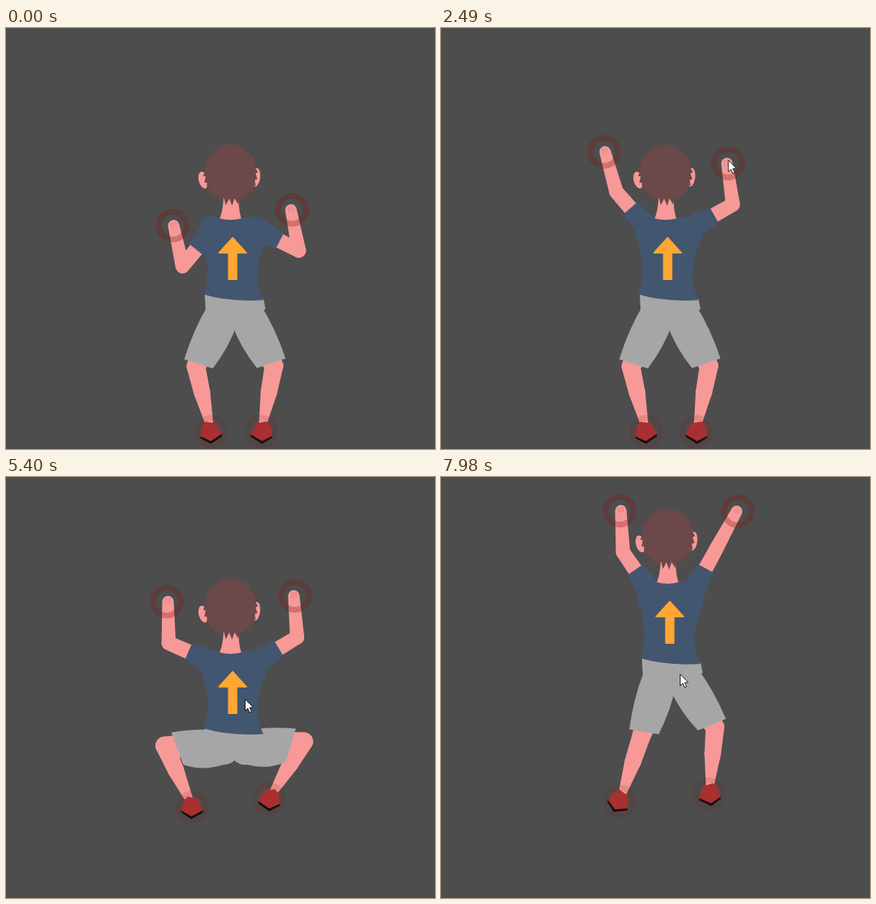
An HTML page with a canvas that plays this animation: 600 by 588 pixels, repeating every 8000 ms.

```html
<!DOCTYPE html>
<html lang="en">
<head>
<meta charset="utf-8">
<title>Climber puppet</title>
<style>
html, body { margin: 0; width: 100%; height: 100%; overflow: hidden; background: #4d4d4d; }
canvas { display: block; }
</style>
</head>
<body>
<canvas id="stage" width="600" height="588"></canvas>
<script>
const ctx = document.getElementById('stage').getContext('2d');
const LOOP = 8000, THIGH = 82, SHIN = 94, UPPER_ARM = 68, FOREARM = 58;
const SKIN = '#f69997', SHIRT = '#43566f', SHORTS = '#a7a6a6', HAIR = '#6b4849';
const SHOE = '#a92f30', ARROW = '#ffa633', BACK = '#4d4d4d';

const point = (x, y) => ({ x, y });
const along = (p, q, u) => point(p.x + (q.x - p.x) * u, p.y + (q.y - p.y) * u);
const angle = (p, q) => Math.atan2(q.y - p.y, q.x - p.x);
const ease = u => u * u * (3 - 2 * u);

// Where the cursor holds a part, relative to that part.
const grips = {
  body: point(334, 331), handL: point(0, -5), handR: point(0, -5),
  footL: point(-10, -3), footR: point(14, -11)
};
const tracks = {};
const place = (part, x, y) => { tracks[part] = [{ t: 0, x, y }]; };

function move(part, start, end, x, y) {
  const track = tracks[part];
  track.push({ ...track[track.length - 1], t: start }, { t: end, x, y });
}

function drag(part, start, end, x, y) {
  const track = tracks[part], from = track[track.length - 1], grip = grips[part];
  tracks.cursor.push({ t: start, x: from.x + grip.x, y: from.y + grip.y });
  move(part, start, end, x, y);
  tracks.cursor.push({ t: end, x: x + grip.x, y: y + grip.y });
}

function sample(track, t) {
  const next = track.findIndex(key => key.t > t);
  if (next < 0) return track[track.length - 1];
  const a = track[next - 1], b = track[next];
  return along(a, b, ease((t - a.t) / (b.t - a.t)));
}

place('cursor', 594, 60);
place('body', 0, 0);
place('handL', 233, 276);
place('handR', 400, 254);
place('footL', 287, 564);
place('footR', 357, 564);

move('cursor', 30, 450, 85, 290);
move('cursor', 450, 780, 233, 271);
drag('handL', 1050, 1530, 214, 185);
drag('handL', 1530, 1650, 228, 173);
drag('handR', 2100, 2700, 402, 164);
drag('footL', 3390, 3540, 289, 546);
drag('footL', 3540, 4050, 249, 456);
drag('footR', 4350, 4620, 367, 501);
drag('footR', 4620, 4740, 368, 450);
move('cursor', 4740, 4890, 334, 331);
drag('body', 5040, 5400, 0, -21);
drag('body', 5400, 5670, 3, -119);
// The planted limbs give a little while the body is pulled up.
move('footL', 5040, 5400, 261, 461);
move('footL', 5400, 5670, 250, 453);
move('footR', 5400, 5670, 375, 443);
move('handL', 5040, 5400, 225, 174);
move('handL', 5400, 5670, 228, 177);
move('handR', 5040, 5400, 404, 166);
move('handR', 5400, 5670, 400, 169);
move('cursor', 5880, 6270, 227, 174);
drag('handL', 6300, 6780, 250, 47);
drag('handR', 7110, 7620, 415, 48);
move('cursor', 7620, 7950, 334, 275);

// Two-bone chain; stretches slightly when the goal is out of reach.
function bend(root, goal, upper, lower, side) {
  const d = Math.hypot(goal.x - root.x, goal.y - root.y), a = angle(root, goal);
  const c = Math.cos(a), s = Math.sin(a);
  const run = (upper * upper - lower * lower + d * d) / (2 * d);
  const rise = side * Math.sqrt(Math.max(0, upper * upper - run * run));
  return { mid: point(root.x + c * run - s * rise, root.y + s * run + c * rise), end: goal };
}

function capsule(p, q, r1, r2, color) {
  const a = angle(p, q), h = Math.PI / 2;
  ctx.fillStyle = color;
  ctx.beginPath();
  ctx.arc(p.x, p.y, r1, a + h, a + 3 * h);
  ctx.arc(q.x, q.y, r2, a - h, a + h);
  ctx.fill();
}

function polygon(points, color) {
  ctx.fillStyle = color;
  ctx.beginPath();
  points.forEach(([x, y]) => ctx.lineTo(x, y));
  ctx.closePath();
  ctx.fill();
}

function ellipse(x, y, rx, ry, turn, color) {
  ctx.fillStyle = color;
  ctx.beginPath();
  ctx.ellipse(x, y, rx, ry, turn, 0, 7);
  ctx.fill();
}

function placed(p, turn, scaleX, scaleY, draw) {
  ctx.save();
  ctx.translate(p.x, p.y);
  ctx.rotate(turn);
  ctx.scale(scaleX, scaleY);
  draw();
  ctx.restore();
}

function ring(p, alpha) {
  ctx.strokeStyle = `rgba(130,20,20,${alpha})`;
  ctx.lineWidth = 8;
  ctx.beginPath();
  ctx.arc(p.x, p.y, 19.5, 0, 7);
  ctx.stroke();
}

function drawArm({ shoulder, arm: { mid, end } }) {
  capsule(shoulder, mid, 11, 10, SKIN);
  capsule(mid, end, 10, 8, SKIN);
  placed(end, angle(mid, end), 1, 1, () => {
    ctx.strokeStyle = 'rgba(170,80,85,.4)';
    ctx.lineWidth = 0.8;
    ctx.beginPath();
    for (let y = -3.5; y <= 3.5; y += 3.5) {
      ctx.moveTo(-3, y);
      ctx.lineTo(5, y * 0.8);
    }
    ctx.stroke();
  });
}

function drawSleeve({ shoulder, arm }) {
  placed(shoulder, angle(shoulder, arm.mid), 1, 1, () => {
    ctx.fillStyle = SHIRT;
    ctx.beginPath();
    ctx.arc(0, 0, 17, Math.PI / 2, Math.PI * 1.5);
    ctx.lineTo(38, -12.5);
    ctx.lineTo(38, 12.5);
    ctx.fill();
  });
}

function drawShin({ hip, side, leg: { mid, end } }) {
  const calf = along(mid, end, 0.4);
  capsule(along(hip, mid, 0.75), mid, 16, 13, SKIN);
  capsule(mid, calf, 13, 11.5, SKIN);
  capsule(calf, along(mid, end, 0.88), 11.5, 5.5, SKIN);
  // The foot turns outward as the thigh lifts.
  const lift = Math.acos(Math.sin(angle(hip, mid)));
  const turn = angle(mid, end) - Math.PI / 2 + side * 0.25 * (lift - 0.54);
  placed(end, turn, side, 1, () => {
    polygon([[-16, 2], [-17, 5], [-4.4, 16.4], [13, 9.8], [13.7, 6]], '#151011');
    polygon([[-11, -11], [-4, -15.5], [9, -10.5], [13.7, 6.5], [-3.6, 12.6], [-16, 2.8]], SHOE);
  });
}

// The hem slants more as the thigh lifts.
function drawThigh({ hip, side, leg }) {
  const turn = angle(hip, leg.mid), drop = Math.sin(turn), inner = 56 + 20 * drop;
  placed(hip, turn, 1, side, () => {
    ctx.fillStyle = SHORTS;
    ctx.beginPath();
    ctx.arc(0, 0, 23, Math.PI / 2, Math.PI * 1.5);
    ctx.quadraticCurveTo(inner * 0.5, -33 + 5 * drop, inner, -25 + 3 * drop);
    ctx.lineTo(74 + 8 * drop, 19);
    ctx.quadraticCurveTo(38, 27, 0, 25);
    ctx.fill();
  });
}

function drawHead() {
  ctx.fillStyle = SKIN;
  ctx.beginPath();
  ctx.moveTo(304, 230);
  ctx.quadraticCurveTo(305, 250, 299, 266);
  ctx.quadraticCurveTo(314, 270, 329, 266);
  ctx.quadraticCurveTo(324, 250, 326, 230);
  ctx.fill();
  ellipse(276, 212.5, 6.5, 12, -0.25, SKIN);
  ellipse(349.5, 208.5, 6, 13, 0.12, SKIN);
  const hair = [], tips = 27;
  for (let i = 0; i < tips * 2; i++) {
    const a = i / tips * Math.PI, low = Math.max(0, Math.sin(a)) ** 4, tip = i % 2;
    const r = tip ? 1.01 + 0.07 * low : 0.92 - 0.08 * low;
    const lean = tip * 0.08 * Math.cos(a);
    hair.push([314 + 38 * r * Math.cos(a + lean), 203 + 42 * r * Math.sin(a + lean)]);
  }
  polygon(hair, HAIR);
}

function drawShirt() {
  ctx.fillStyle = SHIRT;
  ctx.beginPath();
  ctx.moveTo(273, 269);
  ctx.quadraticCurveTo(286, 265, 300, 265);
  ctx.quadraticCurveTo(314, 270, 328, 265);
  ctx.quadraticCurveTo(348, 264, 364, 267);
  ctx.lineTo(366, 288);
  ctx.bezierCurveTo(354, 322, 344, 344, 360, 380);
  ctx.quadraticCurveTo(312, 383, 276, 372);
  ctx.bezierCurveTo(287, 340, 281, 318, 271, 286);
  ctx.fill();
  polygon([[317, 293], [336, 314], [322.5, 314], [322.5, 351], [311.5, 351], [311.5, 314], [298, 314]], ARROW);
  ctx.strokeStyle = ARROW;
  ctx.lineWidth = 2;
  ctx.lineJoin = 'round';
  ctx.stroke();
}

function drawCursor(p) {
  placed(point(p.x + 0.5, p.y + 0.5), 0, 1, 1, () => {
    polygon([[0, 0], [0, 16], [3.6, 12.6], [6.2, 18.4], [8.8, 17.3], [6.3, 11.6], [11.3, 11.4]], '#fff');
    ctx.strokeStyle = '#111';
    ctx.lineWidth = 1;
    ctx.lineJoin = 'miter';
    ctx.stroke();
  });
}

function render(t) {
  const pose = {};
  for (const name in tracks) pose[name] = sample(tracks[name], t);
  const { body } = pose;
  const sides = [[1, pose.handL, pose.footL], [-1, pose.handR, pose.footR]].map(([side, hand, foot]) => {
    const shoulder = point(319.5 - side * 29.5 + body.x, 280 + body.y);
    const hip = point(319.5 - side * 15.5 + body.x, 400 + body.y);
    const fist = point(hand.x + side * 1.5, hand.y);
    return {
      side, hand, foot, shoulder, hip,
      arm: bend(shoulder, fist, UPPER_ARM, FOREARM, -side),
      leg: bend(hip, foot, THIGH, SHIN, side)
    };
  });

  ctx.fillStyle = BACK;
  ctx.fillRect(0, 0, 600, 588);
  sides.forEach(drawShin);
  sides.forEach(drawThigh);
  sides.forEach(drawArm);
  placed(body, 0, 1, 1, () => {
    polygon([[278, 372], [279, 393], [300, 415], [319.5, 412], [339, 415], [363, 392], [360, 378]], SHORTS);
  });
  sides.forEach(drawSleeve);
  placed(body, 0, 1, 1, () => {
    drawShirt();
    drawHead();
  });
  for (const { hand, foot } of sides) {
    ring(hand, 0.3);
    ring(foot, 0.13);
  }
  if (t >= 30) drawCursor(pose.cursor);
}

const start = performance.now();
function tick() {
  render((performance.now() - start) % LOOP);
  requestAnimationFrame(tick);
}
tick();
</script>
</body>
</html>
```
